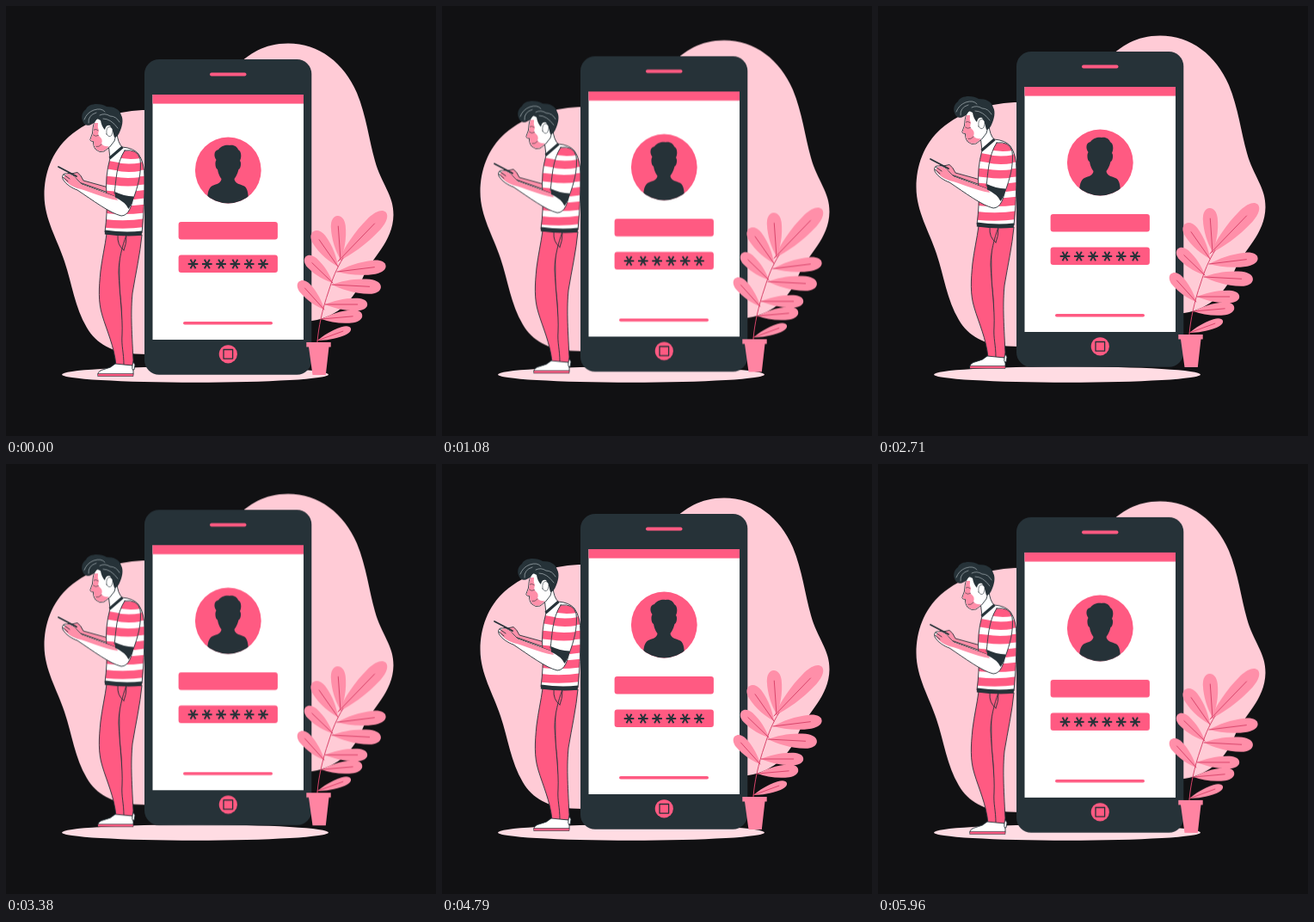
Write an HTML page without scripts that moves like this. It is 500x500 px and loops after 6000 ms.

```html
<!DOCTYPE html>
<html lang="en">
<head>
<meta charset="utf-8">
<title>Phone login</title>
<style>
  :root { --ink: #263238; --pink: #ff5a82; --soft: #ff8fa9; --pale: #ffcbd6; }
  html, body { margin: 0; width: 100%; height: 100%; overflow: hidden; background: #111113; }
  svg { display: block; width: 100%; height: 100%; }
  .bob { animation: bob 6s linear infinite; }
  @keyframes bob { 50% { transform: translateY(-10px); } }
  .ink { fill: var(--ink); }
  .pink { fill: var(--pink); }
  .soft { fill: var(--soft); }
  .pale { fill: var(--pale); }
  .white { fill: #fff; }
  .edge { stroke: var(--ink); stroke-width: .9; stroke-linejoin: round; stroke-linecap: round; }
  .thin { stroke-width: .6; }
  .line { fill: none; }
  .vein { fill: none; stroke: #d9456b; stroke-width: 1; stroke-linecap: round; vector-effect: non-scaling-stroke; }
  .star { fill: none; stroke: var(--ink); stroke-width: 1.9; }
  .strand { fill: none; stroke: #aab3b8; stroke-width: .7; stroke-linecap: round; }
  .stripes { fill: none; stroke: var(--pink); stroke-width: 9.5; }
</style>
</head>
<body>
<svg viewBox="0 0 500 500">
  <defs>
    <g id="leaf">
      <path class="soft" d="M0 0C12-5 28-9 46-8.500C55-8 60-4.500 60 0C60 4.500 55 8 46 8.500C28 9 12 5 0 0Z"/>
      <path class="vein" d="M0 0H46"/>
    </g>
    <path id="star" class="star" d="M-5.800 0H5.800M-3-5.200L3 5.200M3-5.200L-3 5.200"/>
    <path id="torso" d="M121 177L135 164Q148 165 154 172Q161 182 161 200Q161 235 158 264L115 263Q118 240 117 222Q115 198 121 177Z"/>
    <path id="sleeve" d="M138 168Q153 166 156 178C158 194 153 211 148 224L126 218C128 205 128 183 138 168Z"/>
    <clipPath id="torsoClip"><use href="#torso"/></clipPath>
    <clipPath id="sleeveClip"><use href="#sleeve"/></clipPath>
    <clipPath id="avatarClip"><circle cx="258.300" cy="191" r="38.4"/></clipPath>
  </defs>

  <ellipse cx="220" cy="428.5" rx="155" ry="9.3" fill="#ffdce3"/>

  <g class="bob">
    <path class="pale" d="M165 121C132 121 97 131 73 152C53 170 44.500 195 44.500 220C44.500 248 60 272 68 297C77 324 80 350 94 374C105 393 124 403 150 404.5C220 409 270 378 356 366C388 361 405 340 414 318C425 292 450 275 450.5 243C451 220 436 206 429 180C422 155 419 128 408 101C393 66 364 43.5 328 43.5C300 43.5 282 56 268 70Z"/>

    <!-- phone -->
    <rect class="ink" x="161" y="62" width="194.3" height="366.8" rx="17"/>
    <rect class="white" x="170.5" y="103" width="175.5" height="285"/>
    <rect class="pink" x="170.5" y="103" width="175.5" height="10.6"/>
    <rect class="pink" x="237" y="77.5" width="42.5" height="4" rx="2"/>
    <circle class="pink" cx="258.3" cy="191" r="38.4"/>
    <path class="ink" clip-path="url(#avatarClip)" d="M244.500 179C241 174 242 168 247 167C250 162 257 161 260 162C265 161 269 164 270 167C274 169 274 176 272 180C274 182 273 189 270.500 190C269 196 267 199 265.500 201C266 206 271 207 276 209C281 211 282 217 282.500 235H233.500C234 217 235 212 240 209C245 207 250 206 250.500 201C249 199 247 196 246 190C243.500 189 242.500 182 244.500 179Z"/>
    <rect class="pink" x="200.6" y="251" width="115.3" height="20.500" rx="3"/>
    <rect class="pink" x="200.6" y="289.6" width="115.3" height="20.500" rx="3"/>
    <use href="#star" x="217.500" y="300"/>
    <use href="#star" x="233.8" y="300"/>
    <use href="#star" x="250.100" y="300"/>
    <use href="#star" x="266.4" y="300"/>
    <use href="#star" x="282.7" y="300"/>
    <use href="#star" x="299" y="300"/>
    <rect class="pink" x="206" y="367" width="104" height="3.6" rx="1.8"/>
    <circle class="pink" cx="258.3" cy="404.8" r="10.6"/>
    <rect class="line edge" x="253" y="399.500" width="10.600" height="10.600" style="stroke-width:1.3"/>

    <!-- plant -->
    <use href="#leaf" transform="translate(386 297) rotate(-46) scale(1.33 1.14)"/>
    <use href="#leaf" transform="translate(389 295) rotate(-94) scale(.85 1)"/>
    <use href="#leaf" transform="translate(386 303) rotate(-125) scale(.83 1)"/>
    <use href="#leaf" transform="translate(380 322) rotate(-136) scale(.73 .88)"/>
    <use href="#leaf" transform="translate(370 353) rotate(-132) scale(.73 .88)"/>
    <use href="#leaf" transform="translate(385 309) rotate(-7) scale(.95 .95)"/>
    <use href="#leaf" transform="translate(379 324) rotate(3) scale(.95 1)"/>
    <use href="#leaf" transform="translate(371 347) rotate(0) scale(.82 .85)"/>
    <use href="#leaf" transform="translate(367 364) rotate(-5) scale(.79 .88)"/>
    <use href="#leaf" transform="translate(362 389) rotate(-20) scale(.69 .62)"/>
    <path class="vein" d="M362 391C363 375 368 352 375 332C380 316 384 306 392 293"/>
    <path fill="#ff84a2" d="M349.300 391H377.700V396.500H375.500L371.800 429H356.500L352 396.500H349.300Z"/>

    <!-- shoes and legs -->
    <path class="white edge" d="M143 409L147 410Q147 414 150 417L149 423H142Z"/>
    <path class="pink edge" d="M132 266L158 266C156 288 151 310 147 334C145 355 146 375 148 412L147 418H130C133 390 137 365 132 330Z"/>
    <path class="pink edge" d="M117 265L140 266C135 280 131 295 131 310C132 335 136 362 135 382C134 396 137 402 137 418H128C126 396 117 377 112 360C107 344 108 328 110 308C112 292 115 280 117 265Z"/>
    <path class="line edge" d="M130 267Q129 278 137 284M140 268Q140 277 137 284"/>
    <path class="white edge" d="M127 416L147 418Q146 422 148 424V428.500H107Q107 424 114 422.500Q122 421 127 416Z"/>
    <path class="pink edge thin" d="M107 427.500H148V430.500H107Z"/>

    <!-- far arm and handset -->
    <path class="soft edge" d="M119 211L90 203Q87 196 83 193.500L76 195L72 194L73 197L80 200L85 205L119 217Z"/>
    <path class="edge" d="M61 187L82 198" style="stroke-width:1.8"/>

    <!-- torso -->
    <use href="#torso" class="white"/>
    <path class="stripes" clip-path="url(#torsoClip)" d="M114 184Q140 190 165 185M112 202Q140 206 165 202M112 219Q140 223 165 218M112 236Q140 239 165 235M112 252.500Q140 256 165 251.500"/>
    <use href="#torso" class="line edge"/>
    <path class="ink" d="M115 260.500Q138 264 158.300 261.500L157.600 266.800Q137 268.500 114.800 265.500Z"/>

    <!-- near arm -->
    <path class="white edge" d="M148 223C146 232 143 244 134 244C121 241 101 226 83 214C77 212 69 207 66 201C65 198 66 195 69 195L74 195Q80 197 83 202L88 207L128 222Z"/>
    <path class="soft" d="M70 195.500L74 195.500Q80 198 83 202.500L88 207.500L128 222L130 226C112 223 96 215 83 212C75 209 68 204 67 199Z"/>
    <path class="line edge" d="M67 196L74 201M66 199L72 204"/>
    <use href="#sleeve" class="white"/>
    <path class="stripes" clip-path="url(#sleeveClip)" d="M125 170Q143 176 162 171M122 185Q140 191 162 186M120 202Q138 207 162 203" />
    <use href="#sleeve" class="line edge"/>
    <path class="ink" d="M126.500 216Q137 221 148.500 221.500Q147 230 142.500 236Q139 228 127 222.500Z"/>

    <!-- head -->
    <path class="white edge" d="M119 160L121 177L135 164Q130 159 129 148Z"/>
    <path class="line" d="M120.500 177L135.500 164" stroke="#263238" stroke-width="3"/>
    <path class="white edge" d="M104 132C101 138 101 143 100.500 148L97.800 155.500Q98 157.500 101.500 157.500C101.500 161 102 164 104.500 167Q109 171 114 169Q121 165 126 157L131 139L118 127Z"/>
    <path class="soft" d="M103 136C101.500 141 101.500 145 101 148.500L98.300 155.500Q98.500 157 102 157C102 161 102.500 164 105 166.700Q109 170 113.500 168.500Q118 166 120 163Q114 164 111 160Q113 155 109 152Q106 150 108 145Q106 141 107 136Z"/>
    <path class="line edge thin" d="M101.500 150Q104 152.500 107.500 150.500M102 144Q104.500 142.500 107 144.500M105 163.500Q108 164.500 111 161"/>
    <path class="ink" d="M106 131C102 138 95 141 91 137C87 132 87 124 93 120C95 113 110 112 117 117C126 117 132 120 134 127C137 132 135 141 132 147Q130 152 126 153Q125 146 121 139Q116 138 115 144Q111 140 110 133Z"/>
    <path class="white edge thin" d="M117 149Q116 140 121 140.500Q126 142 123 150Q120 154 117 149Z"/>
    <path class="strand" d="M91 132Q94 124 102 121Q111 118 115 123M96 136Q95 127 105 124M109 127Q115 124 121 128Q128 128 132 135M113 131Q122 131 130 142"/>
  </g>
</svg>
</body>
</html>
```
